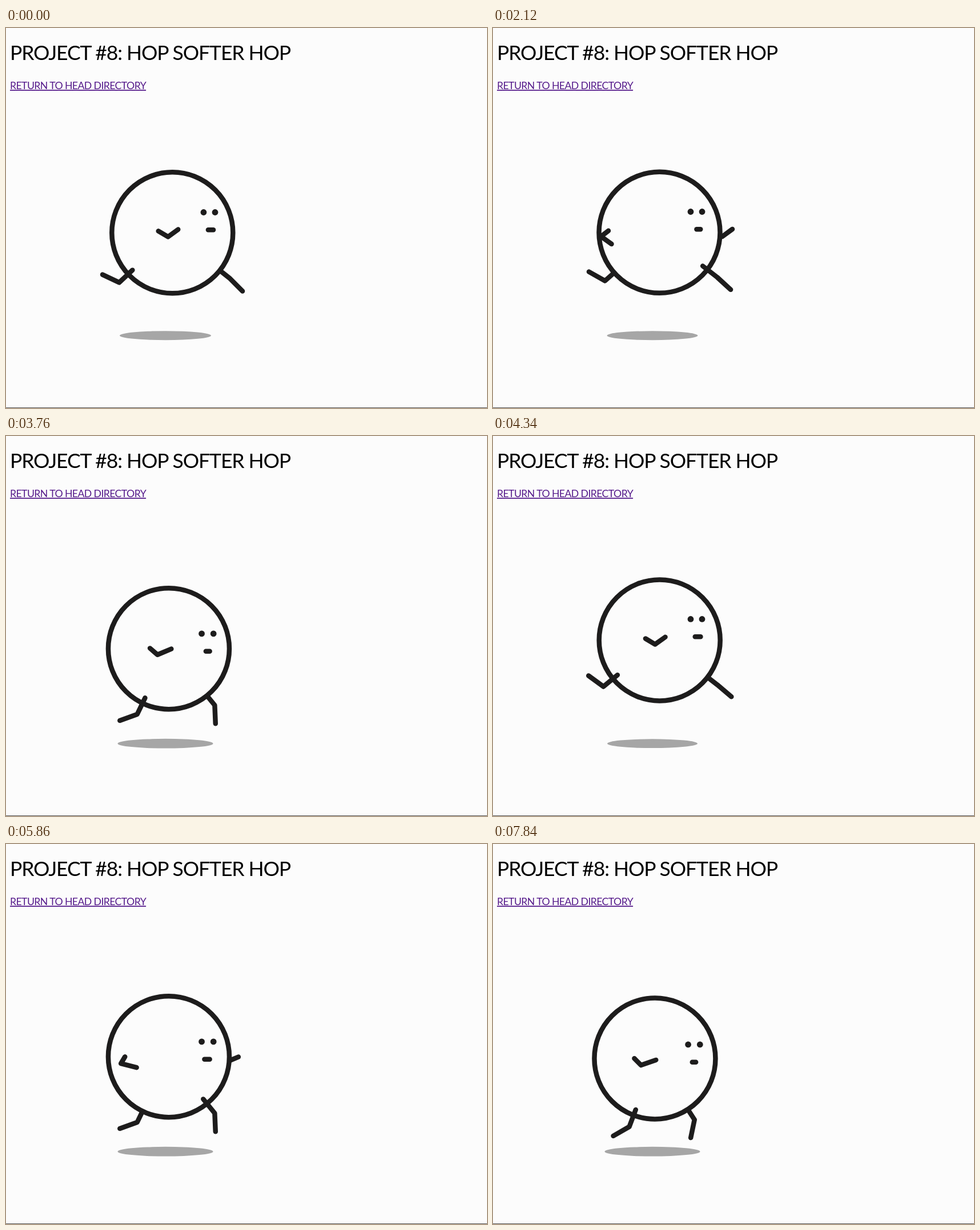
These frames come from a looping animation (842 px wide and 665 px high, 7860 ms). An HTML page:

```html
<!DOCTYPE html>
<html lang="en">
<head>
<meta charset="utf-8">
<title>Project #8</title>
<style>
  html, body { margin: 0; width: 100%; height: 100%; overflow: hidden; background: #fcfcfc; }
  svg { display: block; width: 842px; height: 665px; }
  text { font-family: Lato, "Open Sans", sans-serif; }
  .title { font-size: 35.5px; letter-spacing: -1.1px; }
  .link { font-size: 17.7px; letter-spacing: -0.6px; fill: #551a8b; text-decoration: underline; text-decoration-thickness: 1px; }
  .ink { fill: none; stroke: #1d1c1c; stroke-width: 8.5; stroke-linecap: round; stroke-linejoin: round; }
  #body { fill: #fcfcfc; }
</style>
</head>
<body>
<svg viewBox="0 0 842 665">
  <text class="title" x="7" y="56">PROJECT #8: HOP SOFTER HOP</text>
  <text class="link" x="7" y="107">RETURN TO HEAD DIRECTORY</text>
  <rect y="664" width="842" height="1" fill="#555"/>
  <ellipse id="shadow" cx="279" cy="538.2" fill="#a6a6a6"/>
  <polyline id="farArm" class="ink"/>
  <polyline id="farLeg" class="ink"/>
  <circle id="body" class="ink" r="106"/>
  <circle id="eyeL" r="5.4" fill="#1d1c1c"/>
  <circle id="eyeR" r="5.4" fill="#1d1c1c"/>
  <polyline id="mouth" class="ink"/>
  <polyline id="nearArm" class="ink"/>
  <polyline id="nearLeg" class="ink"/>
</svg>
<script>
const LOOP = 7860;
const STRIDE = 90;   // steps in a full run cycle; the body bounces twice per cycle

// [step, degrees]
const hipKeys = [[0.5, -47.7], [7, -51], [16, -41.6], [23, -16.2], [34, 36.3],
  [45.5, 51.9], [52, 48.5], [61, 28.4], [68, 9.1], [79, -23.2]];
const kneeKeys = [[0.5, -69.7], [8, -86], [16, -93.5], [23, -93.3], [34, -40.5],
  [45.5, -5.5], [53, -2], [61, -4], [68, -16], [79, -42]];

const cosDeg = a => Math.cos(a * Math.PI / 180);
const sinDeg = a => Math.sin(a * Math.PI / 180);
const mod = (a, n) => ((a % n) + n) % n;

function set(id, attrs) {
  const el = document.getElementById(id);
  for (const key in attrs) el.setAttribute(key, attrs[key]);
}

function line(id, points) {
  set(id, { points: points.map(p => p[0].toFixed(2) + ',' + p[1].toFixed(2)).join(' ') });
}

// Periodic cubic through the keys
function spline(keys, step) {
  const n = keys.length;
  const at = i => [keys[mod(i, n)][0] + STRIDE * Math.floor(i / n), keys[mod(i, n)][1]];
  const slope = i => (at(i + 1)[1] - at(i - 1)[1]) / (at(i + 1)[0] - at(i - 1)[0]);
  const x = mod(step, STRIDE);
  let i = -1;
  while (at(i + 1)[0] <= x) i++;
  const [x0, y0] = at(i), [x1, y1] = at(i + 1);
  const h = x1 - x0, u = (x - x0) / h, v = 1 - u;
  return v * v * (1 + 2 * u) * y0 + u * u * (1 + 2 * v) * y1
    + h * u * v * (v * slope(i) - u * slope(i + 1));
}

// The thigh points away from the body's centre, the shank bends from it
function leg(x, y, step) {
  const hip = spline(hipKeys, step), shank = hip + spline(kneeKeys, step);
  const onRay = r => [x + r * sinDeg(hip), y + r * cosDeg(hip)];
  const knee = onRay(127.5);
  return [onRay(95.7), knee, [knee[0] + 32.3 * sinDeg(shank), knee[1] + 32.3 * cosDeg(shank)]];
}

// Swings slightly longer in front than behind
function arm(x, y, step) {
  const c = cosDeg(4 * (step - 1));
  const s = Math.sign(c) * Math.abs(c) ** 1.2 + 0.14 * (1 - c * c), q = s * s;
  return [
    [x - 57 + 32.5 * s, y + 2 - 5 * q],
    [x - 55 + 47.5 * s, y + 15 - 8 * q],
    [x - 22.5 + 47 * s - 14.5 * q, y + 13.5 - 13 * s - 6.3 * q]
  ];
}

// 0 to 1 and back, twice per stride
const bounce = (step, start, power) => ((1 - cosDeg(8 * (step - start))) / 2) ** power;

function draw(step) {
  const drop = bounce(step, 3.5, 1.15);
  const x = 291.7 - 11 * drop, y = 357.4 + 24 * drop;
  set('body', { cx: x, cy: y });

  const nod = bounce(step, 6, 1.3);
  const eyeX = x + 54.2 + 4.5 * nod, eyeY = y - 37.2 + 14.5 * nod;
  set('eyeL', { cx: eyeX, cy: eyeY });
  set('eyeR', { cx: eyeX + 20 + 0.8 * nod, cy: eyeY });
  const mouthWidth = 8 + 3.3 * cosDeg(4 * (step - 18));
  line('mouth', [[x + 71.7 - mouthWidth, eyeY + 30.8], [x + 71.7, eyeY + 30.8]]);

  line('nearArm', arm(x, y, step));
  line('farArm', arm(x + 117.5, y, step + STRIDE / 2));
  line('nearLeg', leg(x, y, step));
  line('farLeg', leg(x, y, step + STRIDE / 2));

  const swell = Math.max(-1, Math.min(1, 1.8 * cosDeg(8 * (step - 9))));
  const rx = 81.3 - 2.3 * swell;
  set('shadow', { rx, ry: rx * 0.1 });
}

// Steps come in threes, held for 20, 100 and 20 ms
function stepAt(ms) {
  const t = ms % LOOP, r = t % 140;
  return 3 * Math.floor(t / 140) + (r < 20 ? 0 : r < 120 ? 1 : 2);
}

const start = performance.now();
function tick() {
  draw(stepAt(Math.max(0, performance.now() - start)));
  requestAnimationFrame(tick);
}
tick();
</script>
</body>
</html>
```
